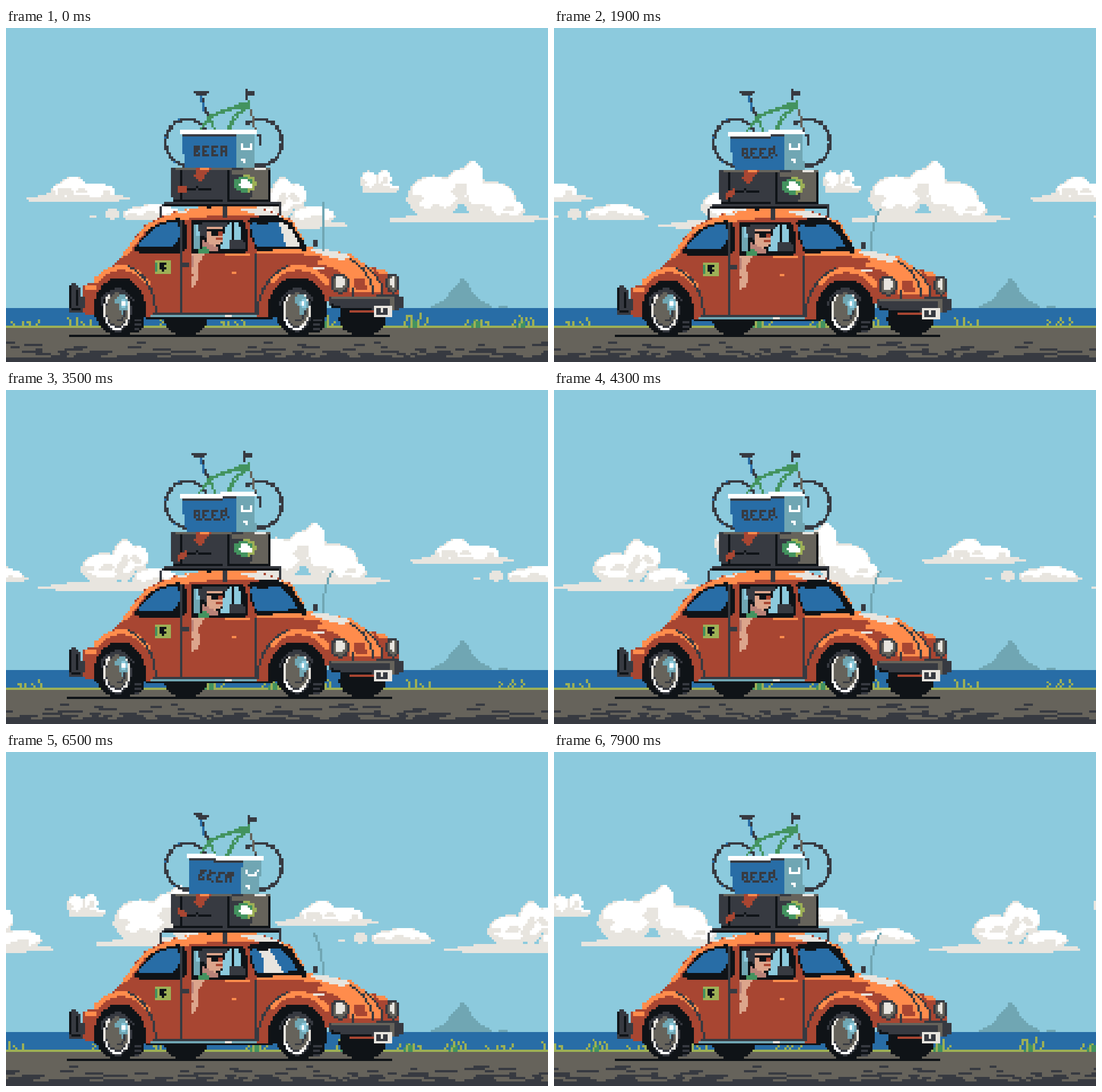
Write an HTML page with a canvas that moves like this. It is 953 by 588 pixels and loops after 8 s.

```html
<!DOCTYPE html>
<html lang="en">
<head>
<meta charset="utf-8">
<title>Beach drive</title>
<style>
html, body { margin: 0; width: 100%; height: 100%; overflow: hidden; background: #8ccadd; }
canvas { display: block; width: 100vw; height: 100vh; image-rendering: pixelated; }
</style>
</head>
<body>
<canvas id="stage" width="240" height="148"></canvas>
<script>
const ctx = document.getElementById('stage').getContext('2d');
const CELL = 3.971, STEP = 100, LOOP = 8000, WIDE = 240, SPAN = 953;
const SKY = '#8ccadd', SEA = '#286da6', TEAL = '#70a6b3', ROAD = '#66635b', DARK = '#373a41',
  BLACK = '#0f1317', RUST = '#a84632', ORANGE = '#ff8c4c', PALE = '#e8e5df', WHITE = '#ffffff',
  SKIN = '#dca58c', SHADE = '#b98278', GREEN = '#43935f', LIME = '#9db056';

// Shapes are given in stage pixels, bent by warp, then rasterised on the coarse grid.
const still = (x, y) => [x, y];
let warp = still;

const pairs = text => text.trim().split(/\s+/).map(p => p.split(',').map(Number));
const project = pts => pts.map(([x, y]) => warp(x, y).map(v => v / CELL));

function fill(color, pts) {
  const p = project(pts), ys = p.map(q => q[1]);
  ctx.fillStyle = color;
  for (let row = Math.floor(Math.min(...ys)); row <= Math.max(...ys); row++) {
    const y = row + .5, hits = [];
    p.forEach(([x1, y1], i) => {
      const [x2, y2] = p[(i + 1) % p.length];
      if ((y1 <= y) !== (y2 <= y)) hits.push(x1 + (y - y1) / (y2 - y1) * (x2 - x1));
    });
    hits.sort((a, b) => a - b);
    for (let i = 0; i + 1 < hits.length; i += 2) {
      const a = Math.round(hits[i]), b = Math.round(hits[i + 1]);
      if (b > a) ctx.fillRect(a, row, b - a, 1);
    }
  }
}
function trace(color, pts, size = 1) {
  const p = project(pts);
  ctx.fillStyle = color;
  for (let i = 0; i + 1 < p.length; i++) {
    const [x, y] = p[i], dx = p[i + 1][0] - x, dy = p[i + 1][1] - y;
    const n = Math.max(1, Math.ceil(Math.max(Math.abs(dx), Math.abs(dy))));
    for (let s = 0; s <= n; s++) ctx.fillRect(Math.floor(x + dx * s / n), Math.floor(y + dy * s / n), size, size);
  }
}
// Closed Catmull-Rom curve through a few key points.
function smooth(keys) {
  const n = keys.length, out = [];
  keys.forEach((b, i) => {
    const a = keys[(i + n - 1) % n], c = keys[(i + 1) % n], d = keys[(i + 2) % n];
    for (let t = 0; t < 1; t += .125) {
      out.push([0, 1].map(k => .5 * (2 * b[k] + (c[k] - a[k]) * t
        + (2 * a[k] - 5 * b[k] + 4 * c[k] - d[k]) * t * t + (3 * b[k] - a[k] - 3 * c[k] + d[k]) * t ** 3)));
    }
  });
  return out;
}
function arcPoints(cx, cy, rx, ry, from = 0, to = 360) {
  const out = [];
  for (let a = from; a <= to; a += 5) {
    const r = a * Math.PI / 180;
    out.push([cx + rx * Math.cos(r), cy + ry * Math.sin(r)]);
  }
  return out;
}
const poly = (color, text) => fill(color, pairs(text));
const blob = (color, text) => fill(color, smooth(pairs(text)));
const line = (color, text, size) => trace(color, pairs(text), size);
const box = (color, x1, y1, x2, y2) => fill(color, [[x1, y1], [x2, y1], [x2, y2], [x1, y2]]);
const arc = (color, cx, cy, rx, ry, from, to, size) => trace(color, arcPoints(cx, cy, rx, ry, from, to), size);
const oval = (color, cx, cy, rx, ry, floor = 588) =>
  fill(color, arcPoints(cx, cy, rx, ry).map(([x, y]) => [x, Math.min(y, floor)]));

function random(seed) {
  return () => (seed = (seed * 16807) % 2147483647) / 2147483647;
}

function scroll(shift, draw) {
  const off = -(shift % WIDE);
  for (const x of [off, off + WIDE]) {
    ctx.save();
    ctx.translate(x, 0);
    draw();
    ctx.restore();
  }
}

// A flat-bottomed heap: puffs are "x,y,rx,ry", lit from the upper right.
function cloud(left, right, base, text) {
  const rnd = random(left * 7 + 11), puffs = pairs(text);
  const mid = (left + right) / 2, half = (right - left) / 2;
  fill(PALE, [[left, base - 4], [mid - half * .5, base - 15], [mid + half * .55, base - 17], [right, base - 8],
    [right, base - 4], [mid + half * .6, base], [mid - half * .7, base]]);
  for (const [x, y, rx, ry] of puffs) oval(PALE, x, y, rx, ry, base);
  for (const [x, y, rx, ry] of puffs) {
    oval(WHITE, x + 2, y - ry * .18, rx * .88, ry * .76, base - 9);
    for (let i = 0; i < 3; i++)
      oval(PALE, x + (rnd() - .75) * rx, y + (rnd() * .8 - .1) * ry, rx * .3, 4 + rnd() * ry * .14, base);
  }
}
function clouds() {
  cloud(28, 217, 306, '98,288,19,15 118,284,27,22 152,288,34,16 178,289,12,13');
  cloud(203, 318, 338, '232,329,26,14 262,327,36,18 290,328,14,12');
  oval(PALE, 186, 327, 13, 9);
  box(PALE, 148, 328, 159, 335);
  cloud(332, 599, 352, '450,314,40,27 486,300,22,37 511,297,17,23 540,331,38,18');
  cloud(623, 690, 290, '638,270,14,18 664,268,13,18 672,283,18,8');
  cloud(660, 953, 342, '752,298,46,38 820,263,18,29 806,278,36,31 852,304,46,34 880,320,32,20');
}

function verge() {
  const rnd = random(77);
  for (const x of [30, 125, 290, 395, 555, 715, 825, 905]) {
    const lush = x > 500;
    if (lush) blob(GREEN, `${x - 6},527 ${x - 2},516 ${x + 3},511 ${x + 10},527`);
    for (let i = 0; i < 4; i++) {
      const foot = x + (i - 1.5) * 12 + rnd() * 6, tall = 5 + rnd() * (lush ? 16 : 13);
      line(LIME, `${foot},525 ${foot + 2},${525 - tall / 2} ${foot + rnd() * 8 - 3},${525 - tall}`);
    }
  }
}

function asphalt() {
  const rnd = random(2024);
  ctx.fillStyle = DARK;
  for (let row = 139; row < 146; row++) {
    const cover = .04 + .6 * ((row - 138) / 7) ** 2;
    for (let x = rnd() * 30; x < WIDE;) {
      const len = 3 + Math.floor(rnd() * (5 + 16 * cover));
      ctx.fillRect(Math.floor(x), row, len, 1);
      x += len + len * (1 - cover) / cover * (.4 + rnd());
    }
  }
}

function scenery(k) {
  ctx.fillStyle = SKY;
  ctx.fillRect(0, 0, WIDE, 148);
  scroll(2 * k, clouds);
  poly(TEAL, '743,492 775,476 783,460 797,450 799,441 807,441 820,464 832,478 853,488 853,492');
  box(TEAL, 865, 487, 881, 492);
  box(SEA, 0, 492, SPAN, 525);
  box(LIME, 0, 524, SPAN, 528.5);
  scroll(30 * k, verge);
  box(ROAD, 0, 528.5, SPAN, 588);
  scroll(30 * k, asphalt);
  box(DARK, 0, 579.7, SPAN, 588);
}

function bike(pose) {
  for (const [cx, from, to] of [[319, 0, 360], [447, -130, 130]]) {
    for (let a = from; a < to; a += 15)
      arc(a % 60 === 0 ? SEA : DARK, cx, 201, 39, 42, a, a + 15);
    arc(DARK, cx, 201, 37.5, 40, from, to);
  }
  line(DARK, '345,120 351,145 357,153');
  line(SEA, '343,122 349,143');
  line(GREEN, '341,180 357,156 368,181');
  line(GREEN, '345,178 360,154 410,135 427,131');
  line(GREEN, '362,156 410,139 425,136');
  line(GREEN, '387,180 403,154 425,134');
  line(GREEN, '391,180 408,154 420,140');
  box(GREEN, 410, 131, 429, 142);
  line(ROAD, '430,144 434,160 438,180');
  line(DARK, '438,180 446,190 446,205');
  const seat = pose === 3 ? 326 : 330, bar = pose === 3 ? 417 : pose === 1 ? 423 : 419, drop = pose === 1 ? 4 : 0;
  poly(DARK, `${seat},${111 - drop} ${seat + 27},111 ${seat + 27},116 ${seat + 22},119.5 ${seat + 12},119.5 ${seat},${116 - drop}`);
  box(DARK, bar, 107 + drop, bar + 5, 129);
  box(DARK, bar + 4, 112 + drop, bar + 16, 119 + drop);
}

function cooler(pose) {
  if (pose === 1) warp = (x, y) => [x + 8 - .05 * (y - 245), y + 2 + .03 * (x - 370)];
  if (pose === 3) warp = (x, y) => [x + 3 + .07 * (y - 245), y + 2 - .035 * (x - 370)];
  poly(SEA, '309,187 405,187 405,251 314,251');
  poly(TEAL, '405,187 438,187 436,251 403,251');
  box(DARK, 309, 187, 405, 191);
  box(WHITE, 307, 179, 440, 187);
  line(WHITE, '414,204 415,211 420,214 429,214 431,205');
  line(WHITE, '416,232 420,232 420,236');
  const strokes = { B: '0,0 2,0 1,2 2,3 2,4 0,4 0,0', E: '2,0 0,0 0,2 1,2 0,2 0,4 2,4', R: '0,4 0,0 2,0 2,1 1,2 2,3 2,4' };
  [...'BEER'].forEach((c, i) =>
    trace(DARK, pairs(strokes[c]).map(([u, v]) => [332 + (i * 4 + u) * CELL, 209 + v * CELL])));
  warp = still;
}

function suitcase(pose) {
  poly(DARK, '291,250 464,250 464,308 295,308 291,302');
  poly(ROAD, '398,253 464,250 464,305 430,305 438,278 422,262 398,262');
  box(ROAD, 296, 249, 398, 253);
  box(PALE, 436, 249, 456, 253);
  for (const x of [308, 393]) line(BLACK, `${x},256 ${x},303`);
  line(BLACK, '294,306 462,306 462,256');
  line(BLACK, '320,289 335,285 345,289 360,286');
  poly(RUST, '334,252 361,252 342,275 330,266');
  box(ORANGE, 340, 250, 358, 254);
  const tilt = pose === 1 ? -8 : pose === 3 ? 8 : 0, top = 282 + tilt;
  poly(RUST, `302,${top} 320,${top - tilt} 318,${top + 10 - tilt} 302,${top + 12}`);
  oval(GREEN, 419, 279, 19, 14);
  arc(LIME, 420, 278, 17, 13, -90, 70);
  blob(WHITE, '409,281 419,270 433,280 424,287');
}

function rack() {
  line(DARK, '273,336 273,320 279,314');
  line(DARK, '481,316 481,332');
  line(DARK, '385,306 385,330', 2);
  box(DARK, 277, 310, 484, 318);
  line(BLACK, '281,316 477,316');
  box(BLACK, 354, 318, 362, 322);
}

function shell() {
  poly(RUST, '136,458 165,447 207,403 225,375 245,350 270,337 300,326 340,319 440,319 475,330 500,340 516,362 528,389 560,394 605,402 640,425 668,430 688,450 692,476 565,484 555,506 440,513 160,510 134,505');
  poly(ORANGE, '250,348 300,326 340,319 440,319 470,330 426,334 330,336 310,344 268,346 245,362 215,403 202,408 224,377');
  poly(PALE, '410,323 446,321 494,338 440,333');
  poly(PALE, '284,332 322,322 318,330');
  box(ORANGE, 140, 456, 158, 464);
  poly(ORANGE, '440,395 528,389 560,394 605,402 642,426 656,444 662,470 604,470 602,446 580,428 545,418 560,408 524,403 440,403');
  poly(PALE, '530,393 565,394 605,405 592,413 560,405');
  box(PALE, 542, 423, 560, 429);
  poly(ORANGE, '648,428 668,431 676,439 656,438');
  poly(RUST, '612,446 630,446 636,466 614,466');
  line(DARK, '606,410 628,428 642,450 646,472');
  line(DARK, '634,424 652,442 660,456 662,472');
  line(DARK, '609,462 609,474');
}

function driver() {
  blob(SKIN, '354,352 380,354 381,376 374,386 360,388 348,380');
  poly(SHADE, '347,378 360,386 372,388 374,398 348,398');
  blob(DARK, '338,352 354,346 388,347 382,354 356,354 352,372 342,366');
  line(BLACK, '346,370 352,380');
  box(BLACK, 352, 358, 381, 363);
  box(BLACK, 361, 360, 373, 370);
  box(RUST, 373, 360, 381, 370);
  line(RUST, '371,377 378,377');
  blob(GREEN, '338,399 346,390 356,394 354,402');
}

function glass(pose) {
  blob(BLACK, '228,397 240,374 264,350 312,342 314,396 270,402');
  blob(SEA, '234,388 248,368 268,352 300,347 303,376 285,389');
  poly(BLACK, '324,341 418,341 426,368 427,399 326,401');
  box(TEAL, 330, 350, 343, 392);
  box(SKY, 334, 350, 343, 370);
  poly(SKY, '386,348 410,346 414,372 414,391 378,393');
  line(BLACK, '399,346 399,390');
  blob(DARK, '394,380 405,376 418,380 420,391 396,392');
  driver();
  poly(BLACK, '426,340 450,334 478,336 500,348 526,391 440,397 430,370');
  poly(SEA, '429,350 440,344 482,344 499,360 514,386 440,391');
  // A pale reflection slides across the windscreen, then leaves.
  const x = 500 - pose * 34;
  if (pose < 3) poly(PALE, `${x - 25},340 ${x + 4 - pose * 10},341 ${x + 22},388 ${x - 8 - pose * 4},389 ${x - 14},362`);
  line(BLACK, '470,336 490,342 506,356 524,390', 2);
  line(ORANGE, '488,336 502,345 521,376');
  box(DARK, 541, 378, 548, 391);
  box(BLACK, 440, 341, 462, 348);
}

function fenders() {
  for (const [cx, rx, side] of [[200, 46, -75], [512, 52, 180]]) {
    arc(ORANGE, cx, 500, rx + 15, 76, 225, 320, 2);
    arc(DARK, cx, 506, rx + 17, 84, side, side + 75);
    oval(BLACK, cx, 499, rx, 56, 514);
  }
}

function trim(pose) {
  line(DARK, '307,344 307,508');
  line(DARK, '438,405 438,510');
  line(ORANGE, '386,404 427,404');
  box(ORANGE, 397, 433, 405, 437);
  box(DARK, 308, 417, 322, 424);
  const elbow = pose === 3 ? 342 : 336;
  poly(SKIN, `325,402 350,401 338,420 ${elbow},446 334,457 325,461 328,440`);
  poly(SHADE, '324,405 330,405 329,425 324,425');
  box(LIME, 262, 412, 290, 438);
  box(GREEN, 262, 416, 286, 434);
  oval(LIME, 276, 425, 11, 11);
  poly(BLACK, '268,420 282,415 282,420 276,424 282,426 276,434 270,429');
  box(DARK, 258, 506, 440, 510);
  box(TEAL, 254, 510, 440, 514);
  box(PALE, 386, 510, 398, 514);
  box(BLACK, 245, 514, 468, 518);

  blob(DARK, '113,458 128,458 130,474 140,480 136,500 120,506 112,498');
  line(BLACK, '115,460 115,496 130,500');
  box(BLACK, 123, 464, 127, 492);

  for (const [x, rx] of [[587, 17], [680, 12]]) {
    oval(DARK, x, 453, rx, 18);
    oval(ROAD, x, 453, rx - 4, 14);
    oval(PALE, x, 451, rx - 8, 11);
  }
  poly(DARK, '567,478 690,473 698,479 698,494 688,501 580,498 569,490');
  line(ROAD, '574,480 676,480');
  box(ROAD, 676, 476, 684, 499);
  line(BLACK, '572,492 590,497 640,498');
  box(RUST, 604, 500, 646, 506);
  box(PALE, 646, 491, 679, 513);
  line(DARK, '653,499 653,506 671,506 671,499');
  for (const x of [659, 665]) line(DARK, `${x},498 ${x},506`);
}

function wheel(cx, odd) {
  oval(BLACK, cx + 4, 500, 42, 42);
  poly(BLACK, `${cx + 20},482 ${cx + 48},512 ${cx + 47},528 ${cx + 36},536 ${cx + 6},540`);
  for (let y = 514; y < 536; y += 8) line(DARK, `${cx + 32},${y + odd * 4} ${cx + 42 - (y - 514) / 3},${y + odd * 4}`);
  arc(DARK, cx, 498, 31, 38, 200, 330);
  oval(DARK, cx, 498, 25, 37);
  arc(PALE, cx - 1, 497, 22, 33, -50, 230);
  arc(WHITE, cx - 1, 497, 22, 33, 60, 150);
  oval(ROAD, cx, 495, 20, 29);
  oval(TEAL, cx + 7, 486, 12, 18);
  oval(SKY, cx + 11, 484, 6, 9);
  oval(ROAD, cx - 5, 500, 10, 17);
  arc(DARK, cx + 1, 497, 12, 19, 10, 100);
  box(WHITE, cx + 8, 482, cx + 14, 488);
}

function antenna(pose) {
  const lean = pose === 1 ? -15 : pose === 3 ? 16 : 0, top = lean ? 319 : 307;
  for (let y = top; y < 393; y += 2) {
    const t = Math.max(0, (392 - y) / (392 - top));
    line(TEAL, `${557 + lean * t ** 2.2},${y} ${557 + lean * t ** 2.2},${y}`);
  }
}

function render(time) {
  const k = Math.floor(time % LOOP / STEP), pose = k % 4, odd = pose % 2;
  scenery(k);
  bike(pose);
  cooler(pose);
  box(BLACK, odd ? 108 : 112, 540, odd ? 678 : 674, 544);
  oval(BLACK, 316, 512, 38, 29);
  oval(BLACK, 627, 512, 42, 30);
  // The body hops one cell on every other step; the wheels stay on the road.
  warp = (x, y) => [x, y - (odd ? 0 : CELL)];
  suitcase(pose);
  shell();
  rack();
  glass(pose);
  fenders();
  trim(pose);
  warp = still;
  wheel(196, odd);
  wheel(512, odd);
  antenna(pose);
}

let start;
function tick(now) {
  start ??= now;
  render(now - start);
  requestAnimationFrame(tick);
}
render(0);
requestAnimationFrame(tick);
</script>
</body>
</html>
```
